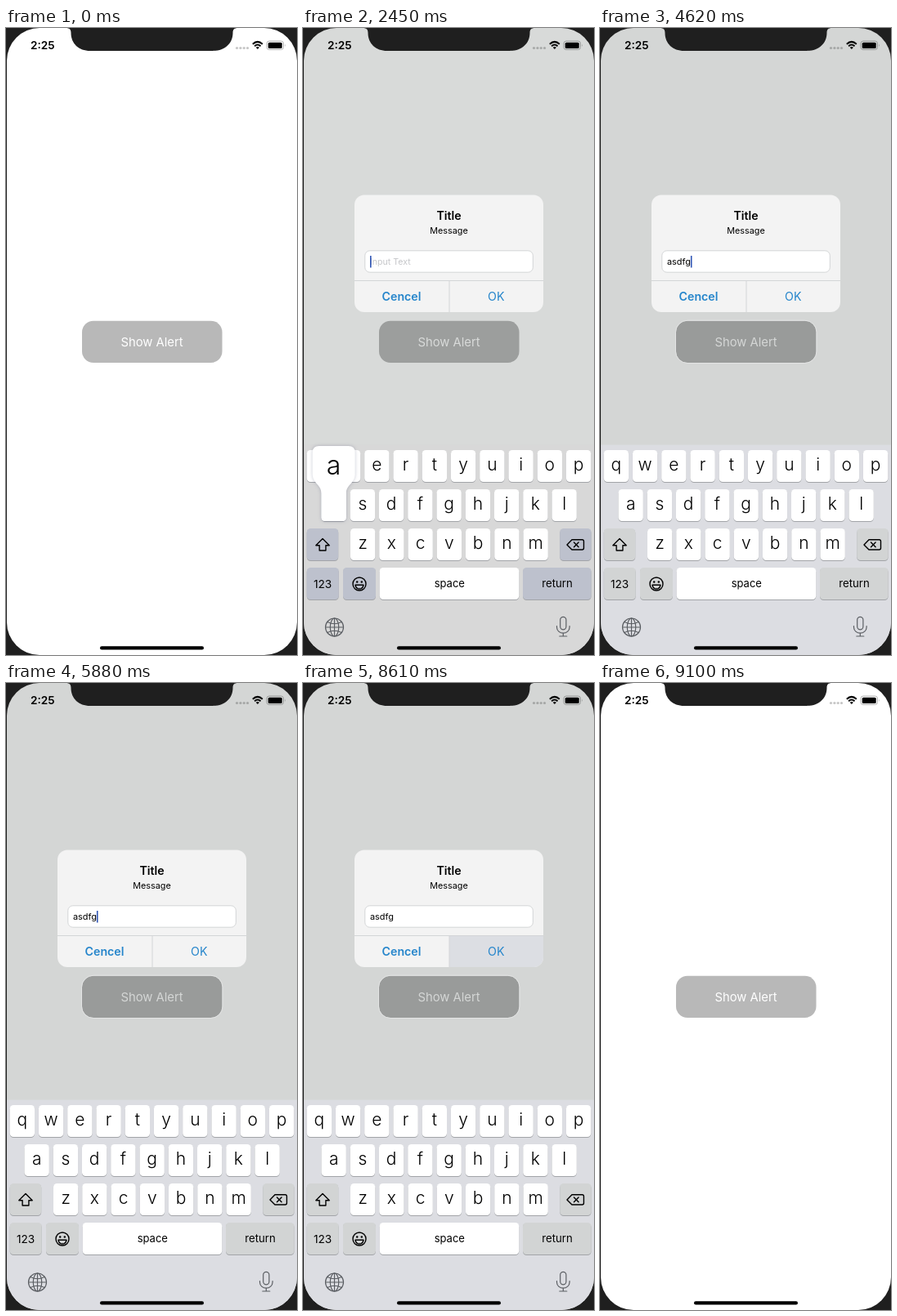
Recreate the animation shown at these times as an HTML page. Size 356x768 px, loop 9.59 s.

```html
<!DOCTYPE html>
<html lang="en">
<head>
<meta charset="utf-8">
<title>Alert with text field</title>
<style>
  html, body { margin: 0; width: 100%; height: 100%; overflow: hidden; background: #1f1f1f; }
  svg { display: block; width: 356px; height: 768px; font-family: Inter, Roboto, sans-serif; }
  text { white-space: pre; }
  .mid { text-anchor: middle; }
  .semi { font-weight: 600; }
  .board { fill: #dcdde2; }
  .fn { fill: #d2d4d4; }
  .edge { fill: none; stroke: #e3e4e4; }
  .cool .board { fill: #d8d8d8; }
  .cool .fn { fill: #bdc1cd; }
  .cool .edge { stroke: none; }
  .line { fill: none; stroke: #000; stroke-width: 1.4; stroke-linejoin: round; stroke-linecap: round; }
  .thin { fill: none; stroke: #5b5e63; stroke-width: 1.2; stroke-linecap: round; }
  .letter { font-size: 21px; font-weight: 300; text-anchor: middle; }
  .blue { fill: #2585cb; font-size: 14.2px; }
  #balloon { filter: drop-shadow(0 0 2px rgba(70, 75, 110, .3)); }
</style>
</head>
<body>
<svg id="stage" viewBox="0 0 356 768">
  <defs>
    <clipPath id="screen"><rect x="1" width="355" height="768" rx="40"/></clipPath>
    <clipPath id="card"><rect x="63" y="204.500" width="231" height="143.500" rx="12"/></clipPath>
  </defs>
  <rect width="356" height="768" fill="#1f1f1f"/>
  <g clip-path="url(#screen)">
    <rect width="356" height="768" fill="#fff"/>
    <g id="status">
      <g fill="#c6c6c6">
        <circle cx="282.500" cy="24.500" r="1.600"/><circle cx="286.900" cy="24.500" r="1.600"/>
        <circle cx="291.200" cy="24.500" r="1.600"/><circle cx="295.500" cy="24.500" r="1.600"/>
      </g>
      <rect x="319" y="16" width="20.500" height="10.500" rx="3" fill="#fff" stroke="#b4b4b4"/>
      <path d="M341 19.500q1.500 1.700 0 3.500z" fill="#b4b4b4"/>
    </g>
    <rect x="93" y="358.700" width="171.500" height="51.300" rx="14" fill="#b8b8b8"/>
    <text class="mid" x="178.500" y="390" font-size="14.800" fill="#fff">Show Alert</text>
    <rect id="dim" width="356" height="768" fill="#020e08"/>

    <text class="semi" x="30" y="26" font-size="13.600">2:25</text>
    <rect x="320.700" y="17.700" width="17" height="7.200" rx="1.500"/>
    <g fill="none" stroke="#000" stroke-width="2">
      <path d="M301.800 19.700Q307.800 14 313.800 19.700"/>
      <path d="M304.100 22.200Q307.800 18.800 311.500 22.200"/>
    </g>
    <path d="M305.700 23.800Q307.800 22.100 309.900 23.800L307.800 26z"/>

    <g id="alert">
      <rect class="edge" x="92.500" y="358.200" width="172.500" height="52.300" rx="14.500"/>
      <g clip-path="url(#card)">
        <rect x="63" y="204" width="231" height="144" fill="#f3f3f3"/>
        <rect id="pressed" x="179" y="309.500" width="116" height="39" fill="#dcdee3"/>
        <path d="M63 309.500H294M179 309.500V348" stroke="#d3d5d7"/>
      </g>
      <text class="mid semi" x="178.500" y="235" font-size="14.200">Title</text>
      <text class="mid" x="178.500" y="252" font-size="10.800">Message</text>
      <rect x="75.800" y="272.800" width="205.500" height="26.400" rx="6" fill="#fff" stroke="#d3d5d6"/>
      <text id="hint" x="82" y="290" font-size="10.600" fill="#c5c6c9">Input Text</text>
      <text id="value" x="82" y="290" font-size="10.900"></text>
      <rect id="caret" y="279" width="1.600" height="14.500" fill="#2f55b5"/>
      <text class="mid semi blue" x="120.500" y="334">Cencel</text>
      <text class="mid blue" x="236.300" y="334">OK</text>
    </g>

    <g id="keyboard">
      <rect class="board" y="510.500" width="356" height="258"/>
      <g id="keys"></g>
      <path class="line" d="M24 625.500l8.200 8.300h-4.300v6.200h-7.800v-6.200h-4.300z"/>
      <path class="line" d="M329 626.800h12.500q2 0 2 2v8.200q0 2-2 2H329l-6-6.100zM331.500 630l5.600 5.800M337.100 630l-5.600 5.800"/>
      <circle class="line" cx="69" cy="681" r="8"/>
      <circle cx="66.200" cy="678.500" r="1.200"/><circle cx="71.800" cy="678.500" r="1.200"/>
      <path class="line" d="M64 682.300H74Q73 687 69 687T64 682.300z"/>
      <g class="thin">
        <circle cx="38.500" cy="734" r="11"/><ellipse cx="38.500" cy="734" rx="5.200" ry="11"/>
        <path d="M38.500 723V745M27.500 734H49.500M30 727.500Q38.500 732 47 727.500M30 740.500Q38.500 736 47 740.500"/>
        <rect x="314.700" y="721.300" width="7.200" height="15.500" rx="3.600"/>
        <path d="M310.500 732.500v1.500a7.800 7.200 0 0 0 15.600 0v-1.500M318.300 741.200V745M313.800 745h9"/>
      </g>
      <g id="balloon">
        <path fill="#fff" d="M-18 512H18Q26 512 26 520V546C26 558 15.200 559 15.200 570V599.500Q15.200 604 10.700 604H-10.700Q-15.200 604-15.200 599.500V570C-15.200 559-26 558-26 546V520Q-26 512-18 512z"/>
        <text id="big" class="mid" y="547" font-size="32" font-weight="300"></text>
      </g>
    </g>
    <rect x="115" y="757.300" width="127" height="4.200" rx="2.100"/>
  </g>
  <path d="M73 0C78 0 79.500 2 79.500 6C79.500 19 89 28 103 28H253C267.500 28 277.500 19 277.500 6C277.500 2 279 0 284 0z" fill="#1f1f1f"/>
</svg>
<script>
const LOOP = 9590, STEP = 70, OPEN = 1050, CLOSE = 8610, GONE = 9100, LIMIT = 5;
const $ = id => document.getElementById(id);

// key, time down, time up
const taps = [
  ['a', 2450, 2730], ['s', 3080, 3290], ['d', 3430, 3640], ['f', 3850, 4060], ['g', 4200, 4340],
  ['h', 4900, 5180], ['j', 6090, 6300], ['k', 6790, 7000], ['l', 7420, 7700]
];
// time, caret opacity
const blink = [
  [1050, .3], [1260, 1], [1680, 1], [1890, 0], [2100, 0], [2310, 1], [5460, 1],
  [5670, 0], [5740, 0], [5880, 1], [8190, 1], [8400, 0]
];

const centers = {};
let markup = '';
function key(x, y, w, kind) {
  const shape = (top, attr) => `<rect x="${x}" y="${top}" width="${w}" height="39" rx="4.5" ${attr}/>`;
  markup += shape(y + 1, 'fill="#a2a4a8"') + shape(y, kind ? `class="${kind}"` : 'fill="#fff"');
}
function label(str, x, y, size) {
  markup += `<text class="mid" x="${x}" y="${y}" font-size="${size}">${str}</text>`;
}
[['qwertyuiop', 4.7], ['asdfghjkl', 22.5], ['zxcvbnm', 58]].forEach(([row, x0], r) => {
  [...row].forEach((ch, i) => {
    const x = x0 + i * 35.25, y = 517 + r * 48;
    key(x, y, 30.3);
    centers[ch] = x + 15.15;
    markup += `<text class="letter" x="${centers[ch]}" y="${y + 25}">${ch}</text>`;
  });
});
key(4.7, 613, 38.5, 'fn');
key(314.3, 613, 38.3, 'fn');
key(4.7, 661, 39, 'fn');
key(49, 661, 40, 'fn');
key(93.7, 661, 170.6);
key(269, 661, 83.6, 'fn');
label('123', 24, 685.5, 13.6);
label('space', 179.3, 684.5, 13);
label('return', 311, 684.5, 13.2);
$('keys').innerHTML = markup;

function ramp(points, t) {
  if (t <= points[0][0]) return points[0][1];
  for (let i = 1; i < points.length; i++) {
    const [t0, v0] = points[i - 1], [t1, v1] = points[i];
    if (t < t1) return v0 + (v1 - v0) * (t - t0) / (t1 - t0);
  }
  return points[points.length - 1][1];
}
const show = (el, on) => el.setAttribute('visibility', on ? 'inherit' : 'hidden');

function draw(t) {
  const open = t >= OPEN && t < GONE;
  const out = Math.min(1, Math.max(0, (t - CLOSE) / (GONE - CLOSE)));
  const fade = 1 - Math.min(1, out * 1.5);
  const tap = taps.find(([, down, up]) => t >= down && t < up);
  const typed = taps.filter(p => t >= p[2]).map(p => p[0]).join('').slice(0, LIMIT);

  $('stage').classList.toggle('cool', !!tap);
  $('dim').setAttribute('opacity', open ? (tap ? .153 : .17) * fade : 0);
  show($('alert'), open);
  show($('keyboard'), open);
  $('alert').setAttribute('opacity', fade);
  $('keyboard').setAttribute('transform', `translate(0 ${258 * (1 - (1 - out) ** 2)})`);
  show($('pressed'), t >= 8470);

  show($('hint'), !typed);
  $('value').textContent = typed;
  $('caret').setAttribute('x', 82 + (typed ? $('value').getComputedTextLength() : 0));
  $('caret').setAttribute('opacity', ramp(blink, t));

  show($('balloon'), tap);
  if (tap) {
    $('balloon').setAttribute('transform', `translate(${centers[tap[0]]} 0)`);
    $('big').textContent = tap[0];
  }
}
function tick() {
  const t = performance.now() % LOOP;
  draw(Math.floor(t / STEP) * STEP);
  requestAnimationFrame(tick);
}
tick();
</script>
</body>
</html>
```
